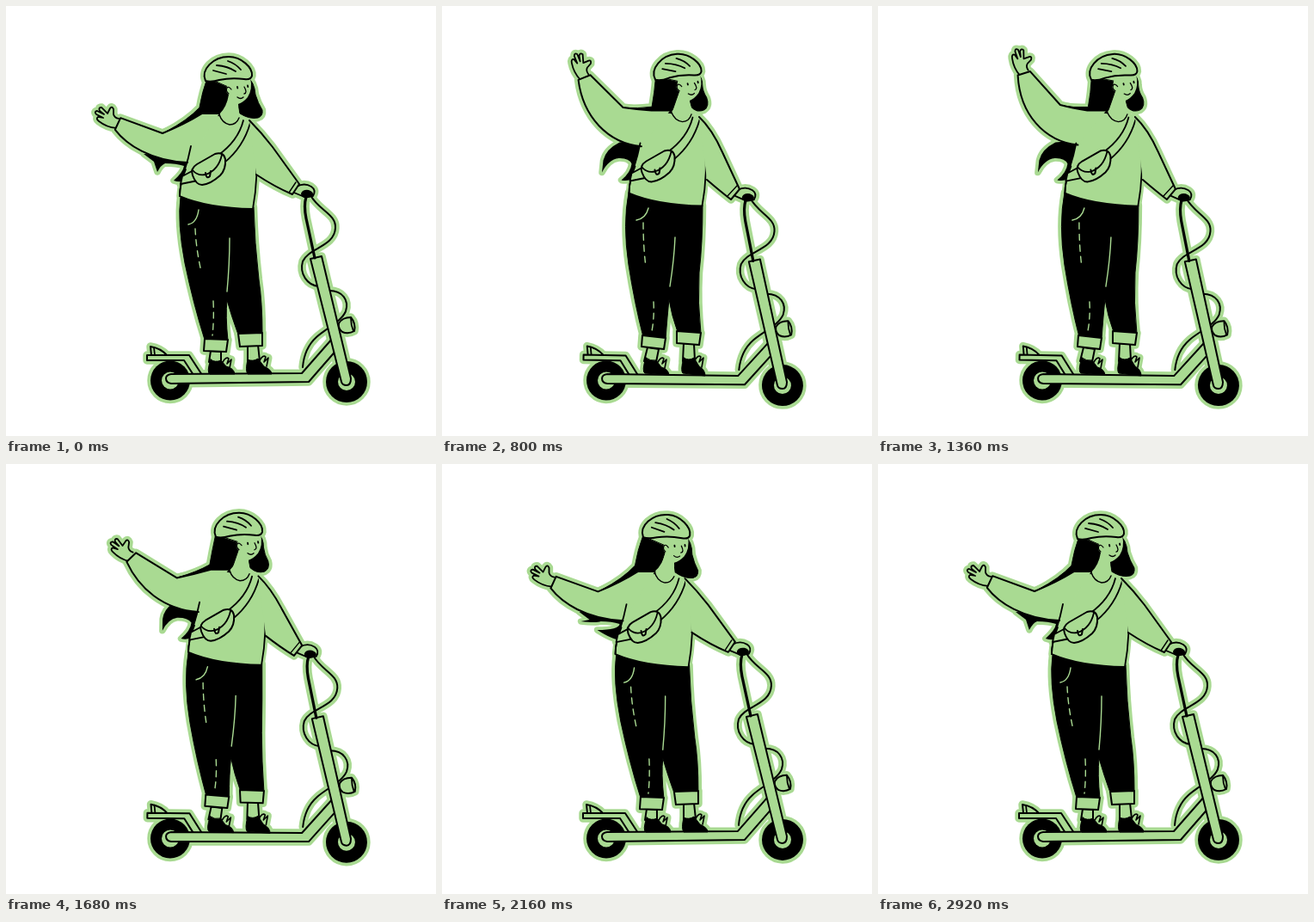
Write an HTML page with a canvas that moves like this. It is 500 px wide and 500 px high and loops after 2960 ms.

```html
<!DOCTYPE html>
<html lang="en">
<head>
<meta charset="utf-8">
<title>Scooter wave</title>
<style>
html, body { margin: 0; width: 100%; height: 100%; overflow: hidden; background: #fff; }
canvas { display: block; width: 500px; height: 500px; }
</style>
</head>
<body>
<canvas id="stage" width="500" height="500"></canvas>
<script>
const ctx = document.getElementById('stage').getContext('2d');
const GREEN = '#a9da92', BLACK = '#000';
const LOOP = 2960, STEP = 40, HALO = 7.5;

// time, value pairs
const LEAN = [[0, 0], [440, .57], [740, 1], [1320, 1], [1680, .65], [2120, -.03], [2960, 0]];
const WAVE = [[0, 0], [440, .75], [640, 1.1], [900, .8], [1280, 1.02], [1360, 1], [1680, .45], [2120, -.01], [2960, 0]];
const WRIST = [[0, 0], [440, 16], [800, 41], [1200, 46], [1360, 44], [1680, 8], [2160, 0], [2960, 0]];
const TILT = [[0, 0], [440, 3], [800, -4], [1360, -4], [1680, 0], [2160, 4], [2960, 0]];
const SWAY = [[0, 0], [1680, 0], [2160, 1], [2960, 0]];

// Smooth curve through keys that never overshoots them
function ease(keys, t) {
  let i = 0;
  while (i < keys.length - 2 && t >= keys[i + 1][0]) i++;
  const rate = j => (keys[j + 1][1] - keys[j][1]) / (keys[j + 1][0] - keys[j][0]);
  const slope = j => {
    if (j === 0 || j === keys.length - 1) return 0;
    const a = rate(j - 1), b = rate(j);
    return a * b <= 0 ? 0 : 2 * a * b / (a + b);
  };
  const d = keys[i + 1][0] - keys[i][0], u = (t - keys[i][0]) / d, v = 1 - u;
  return keys[i][1] * v * v * (1 + 2 * u) + keys[i + 1][1] * u * u * (3 - 2 * u)
    + d * u * v * (v * slope(i) - u * slope(i + 1));
}

const lerp = (a, b, k) => a + (b - a) * k;
const rad = deg => deg * Math.PI / 180;
const NUM = /-?\d+(\.\d+)?/g;

// Blend two path strings of the same structure
function mix(a, b, k) {
  const to = b.match(NUM);
  let i = 0;
  return a.replace(NUM, n => lerp(+n, +to[i++], k).toFixed(2));
}

let halo = false;

function shape(d, fill, width = 2) {
  const p = new Path2D(d);
  ctx.fillStyle = halo ? GREEN : fill;
  if (fill) ctx.fill(p);
  ctx.strokeStyle = halo ? GREEN : BLACK;
  ctx.lineWidth = halo ? width + HALO : width;
  if (halo || width) ctx.stroke(p);
}

function detail(d, color = BLACK, width = 1.8) {
  if (halo) return;
  ctx.strokeStyle = color;
  ctx.lineWidth = width;
  ctx.stroke(new Path2D(d));
}

function group(draw, x, y, angle = 0, px = 0, py = 0) {
  ctx.save();
  ctx.translate(x + px, y + py);
  ctx.rotate(angle);
  ctx.translate(-px, -py);
  draw();
  ctx.restore();
}

const disc = (x, y, r) => `M${x - r} ${y}a${r} ${r} 0 1 1 ${2 * r} 0a${r} ${r} 0 1 1 ${-2 * r} 0Z`;

function wheel(x, y, r) {
  shape(disc(x, y, r), BLACK, 0);
  shape(disc(x, y, 10), GREEN, 0);
}

function scooter() {
  wheel(191, 435.5, 23);
  wheel(396, 437, 24);
  shape('M169 406L168 396Q180 398 187 406', GREEN);
  detail('M172 397L173 406');
  shape('M164 406L213 406L228 429L218 429L207 412L164 412Z', GREEN);
  shape('M354 220C364 238 384 242 383 258C382 280 352 281 345 297C341 311 350 325 364 326', null);
  shape('M374 331C392 330 399 343 395 355C390 367 372 375 361 385C350 395 346 408 345 420', null);
  shape('M192 428L344 427L380 386L386 398L352 437L192 439Q186 438 186 433Q186 429 192 428Z', GREEN);
  shape('M354 294L367 291L401 433Q401 441 396 441Q391 441 390 437Z', GREEN);
  shape('M387 369Q391 362 401 362Q407 369 405 378Q398 382 391 379Q386 375 387 369Z', GREEN);
  detail('M401 363Q401 371 404 378');
  shape('M349 222Q346 232 349 247L359 293', null, 3.2);
}

function tail(wave, sway) {
  const k = Math.min(1, Math.max(0, wave * 1.7));
  const x = -14 * sway, y = -10 * sway;
  const down = `M160 172Q168 178 172 181L${176 + x} ${193 + y}Q180 185 185 183Q198 183 207 186Q206 193 ${195 + x} ${203 + y}Q200 205 207 204L216 184L208 174Z`;
  const up = 'M191 162Q175 170 172 183L170.5 197Q178 182 190 180.5Q202 180 205 187Q204 197 193 206Q201 208 208 203L216 180L214 160Z';
  shape(mix(down, up, k), BLACK, 0);
}

function legs(k) {
  const part = (a, b, fill, width) => shape(mix(a, b, k), fill, width);
  const seam = (a, b) => detail(mix(a, b, k), GREEN, 1.4);
  part('M238 401L250 402L250 414L236 414Z', 'M239 397L252 399L249 414L235 413Z', GREEN);
  part('M281 394L293 394L295 413L281 413Z', 'M281 392L293 393L294 412L280 413Z', GREEN);
  part('M238 411Q243 415 250 412L256 419Q265 421 266 428L237 428Q233 426 238 411Z',
    'M237 409Q242 413 249 412L255 420Q263 422 264 429L236 427Q232 425 237 409Z', BLACK, 1);
  part('M281 411Q287 414 293 410L300 419Q309 423 309 428L281 428Q278 424 281 411Z',
    'M281 409Q287 413 293 409L299 419Q306 423 306 430L280 427Q277 424 281 409Z', BLACK, 1);
  part('M252 414Q256 407 259 410L257 416L262 411L260 421', 'M251 414Q255 407 258 410L256 416L261 411L259 421', null, 1.6);
  part('M295 412Q299 405 302 408L300 414L305 409L303 419', 'M294 412Q298 405 301 408L299 414L304 409L302 420', null, 1.6);
  part('M203 222Q199 252 208 299Q218 347 231 388L258 389Q255 360 257 342Q262 360 270 382L298 381Q298 345 294 318Q289 275 288 234Z',
    'M217 217Q210 254 217 301Q224 346 234 385L260 387Q262 360 264 341Q267 360 274 379L301 381Q297 345 299 310Q303 275 303 232Z', BLACK, 1);
  seam('M224 237Q222 252 212 254', 'M240 235Q237 247 226 249');
  seam('M260 270Q260 300 257 332', 'M271 269Q270 294 265 326');
  ctx.setLineDash([7, 6]);
  seam('M220 259Q221 282 227 309', 'M234 252Q234 280 237 303');
  seam('M241 343Q242 365 240 383', 'M246 344Q247 362 244 378');
  ctx.setLineDash([]);
  part('M231 387L258 388L256 402L230 401Z', 'M233 383L260 386L258 399L232 396Z', GREEN);
  part('M270 381L298 380L298 395L272 396Z', 'M273 378L301 380L299 394L273 392Z', GREEN);
}

function backHair(k) {
  shape(mix('M234 84Q228 100 225 118Q211 133 186 146L205 142L250 132L262 96Z',
    'M233 86Q232 105 229 121Q212 122 196 119L212 126L250 132L264 92Z', k), BLACK, 1);
}

function torso() {
  shape('M228 125L271 132L284 133Q291 142 291 175Q293 200 287 236Q235 235 202 221Q203 205 210 185L215 163Z', GREEN, 0);
  detail('M290 159Q294 198 287 236Q235 235 202 221Q202 207 209 190');
}

function hand() {
  shape('M131 131Q126 130 125 126L125 120Q123 116 121 119L118 125L111 118Q107 118 109 122L114 126L106 122Q102 123 105 126L113 130L107 129Q104 131 108 134Q117 141 128 142', GREEN, 1.8);
}

function wavingArm(w, wrist) {
  const turn = rad(12.7 + 40.1 * w), len = lerp(82, 92, w);
  const cx = 210 - len * Math.cos(turn), cy = 155 - len * Math.sin(turn);
  const cuff = rad(-65 + 48 * w), ux = 7.5 * Math.cos(cuff), uy = 7.5 * Math.sin(cuff);
  group(hand, cx - 130, cy - 137, rad(wrist), 130, 137);
  const top = mix('248 125L228 125Q209 137 182 148', '250 125L228 125Q210 122 196.5 118.5', w);
  const under = mix('140 161 168 180 211 182', '149.5 129 178 161 217 165', w);
  shape(`M${top}L${cx + ux} ${cy + uy}L${cx - ux} ${cy - uy}C${under}`, GREEN);
}

function bag() {
  detail('M215 163Q212 178 208 190Q202 208 202 221');
  shape('M276 133Q270 157 246 174L254 182Q276 164 284 136', GREEN, 1.8);
  shape('M218 191L205 198L203 207L223 203', GREEN, 1.8);
  shape('M222 184L243 172Q253 169 255 178Q256 190 249 197Q238 207 228 208Q221 208 217 197Q214 189 222 184Z', GREEN);
  detail('M217 191Q223 198 232 196Q247 191 251 173');
  detail('M232 194Q233 202 237 198L238 192', BLACK, 2);
}

function head(lean) {
  shape(mix('M280 82Q289 88 290 103Q293 113 298 121Q299 128 293 130Q283 132 272 125L268 105Z',
    'M280 82Q287 88 286 97Q286 105 290 112Q293 122 286 126Q278 129 272 122L268 105Z', lean), BLACK, 1);
  shape('M259 86L284 83Q287 97 281 106Q276 112 270 114L271 129Q268 138 260 138Q251 136 248 126Q257 117 259 103Q254 99 257 94Z', GREEN, 0);
  detail('M271 130Q268 138 260 138Q251 136 248 126', BLACK, 1.4);
  detail('M259 102Q255 99 257 95Q259 93 262 97', BLACK, 1.2);
  detail('M277 94Q281 101 277 102M269 106Q273 109 276 106', BLACK, 1.3);
  detail('M269 94L269.3 95.5M281 92.5L281.3 94', BLACK, 1.8);
  shape('M232 87C226 74 241 59 259 59C274 59 287 72 286 81Q285 86 277 85Q262 83 248 86Q238 89 232 87Z', GREEN);
  detail('M241 75L256 79M245 69Q258 70 267 76M258 64Q267 67 273 74');
}

function gripHand() {
  shape('M338 210Q347 205 355 210Q361 214 357 221L347 222L335 217', GREEN, 1.8);
  shape('M343 218Q345 213 352 214Q358 216 357 220Q353 224 347 223Q343 222 343 218Z', BLACK, 0);
}

function restingArm(k) {
  shape(mix('M283 133Q297 147 310 164L341 207L333 219Q312 210 291 196',
    'M299 129Q314 143 326 170L346 213L336 225Q323 215 308 202', k), GREEN);
  detail(mix('M337 205L329 217', 'M343 209L332 221', k), BLACK, 1.4);
}

function figure(t) {
  const lean = ease(LEAN, t), wave = ease(WAVE, t);
  const bx = 15.5 * lean, by = -3.5 * lean, roll = .02 * lean;
  group(scooter, 0, 0, roll, 190, 436);
  group(() => { tail(wave, ease(SWAY, t)); backHair(wave); }, bx, by);
  legs(lean);
  group(torso, bx, by);
  group(() => head(lean), bx + 3 * lean, by, rad(ease(TILT, t)), 262, 122);
  group(() => { wavingArm(wave, ease(WRIST, t)); bag(); }, bx, by);
  group(gripHand, 1.5 * lean, lean, roll, 190, 436);
  restingArm(lean);
}

function frame(now) {
  const t = Math.floor((now % LOOP) / STEP) * STEP;
  ctx.fillStyle = '#fff';
  ctx.fillRect(0, 0, 500, 500);
  ctx.lineJoin = ctx.lineCap = 'round';
  for (halo of [true, false]) figure(t);
  requestAnimationFrame(frame);
}

frame(0);
</script>
</body>
</html>
```
